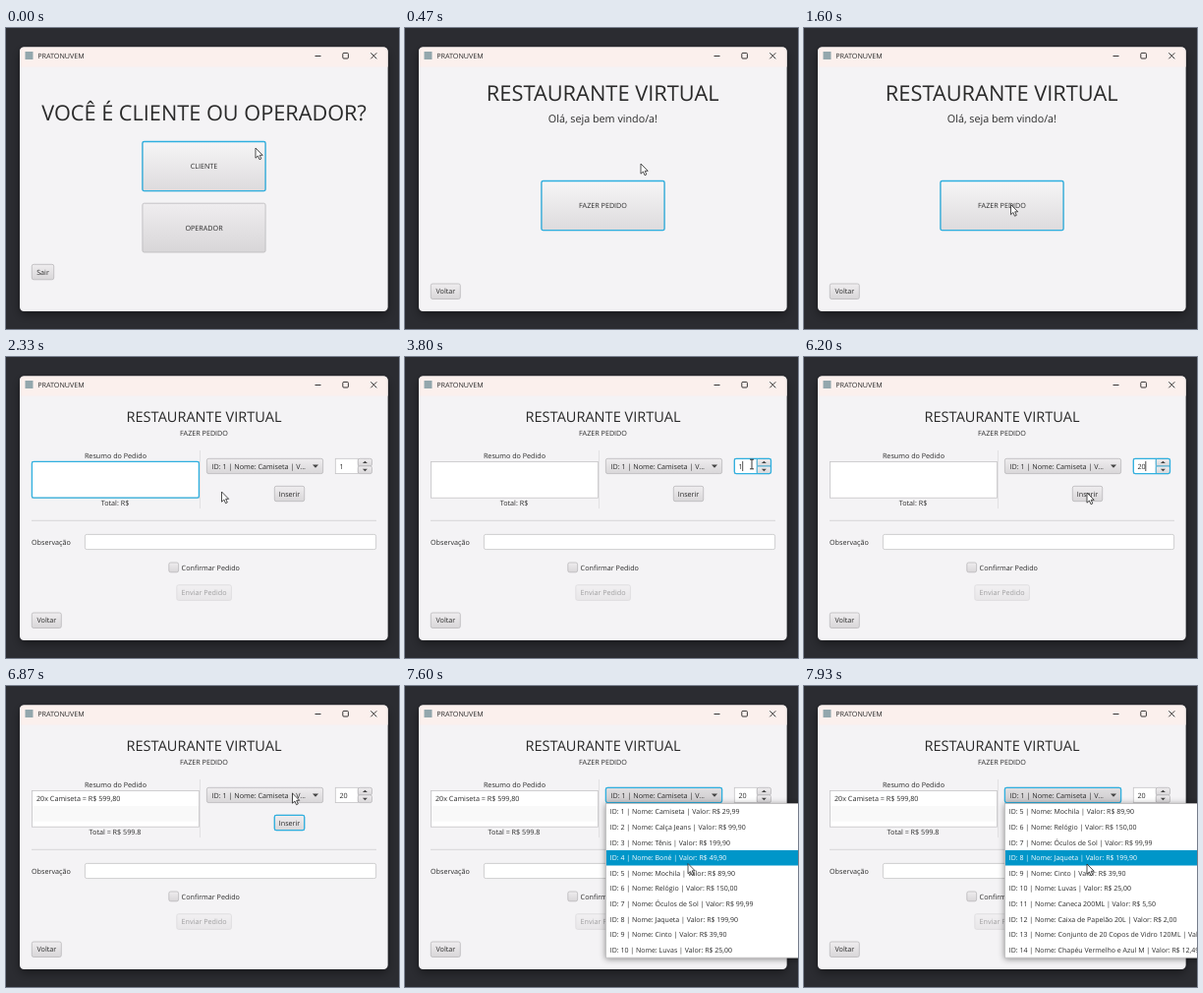
An HTML page for the animation above (8000 ms loop, 400 by 306 pixels).

```html
<!DOCTYPE html>
<html lang="pt">
<head>
<meta charset="utf-8">
<title>Restaurante virtual</title>
<style>
  html, body { margin: 0; width: 100%; height: 100%; overflow: hidden; background: #2b2c31; }
  svg { display: block; width: 100%; height: 100%; }
  text {
    font-family: "Open Sans", "Noto Sans", sans-serif; font-size: 7.2px; fill: #2a2a2a;
    white-space: pre; text-rendering: geometricPrecision;
  }
  .item { font-size: 7px; }
  .ring { fill: none; stroke: #2fb0e0; stroke-width: 1.3; }
  .field { fill: #fff; stroke: #c5c4c6; stroke-width: .8; }
  .line { stroke: #cfced0; stroke-width: .8; }
  .glyph { fill: none; stroke: #222; stroke-width: .9; }
</style>
</head>
<body>
<svg id="stage" viewBox="0 0 400 306"></svg>
<script>
const LOOP = 8000;
const ROW = 15.6, POPUP_TOP = 120.1, MAX_SCROLL = 4 * ROW;
const AT = {
  client: 470, order: 1670, spinner: 3420, two: 4700, twenty: 4950,
  insert: 6330, popup: 7130
};
const NOTCHES = [7740, 7870, 7930];

// Pointer path: time, x, y
const PATH = [
  [0, 254, 122], [350, 240, 138], [500, 240, 138], [1250, 210.5, 179.5], [1690, 210.5, 179.5],
  [2250, 219.5, 137], [2500, 219.5, 137], [3250, 353, 109], [3900, 353, 109], [4450, 338, 110],
  [5350, 338, 110], [6080, 288, 138], [6400, 288, 138], [6800, 291.5, 109], [7200, 291.5, 109],
  [7620, 288, 181], [8000, 288, 181]
];

const ITEMS = [
  ["Camiseta", "29,99"], ["Calça Jeans", "99,90"], ["Tênis", "199,90"], ["Boné", "49,90"],
  ["Mochila", "89,90"], ["Relógio", "150,00"], ["Óculos de Sol", "99,99"], ["Jaqueta", "199,90"],
  ["Cinto", "39,90"], ["Luvas", "25,00"], ["Caneca 200ML", "5,50"], ["Caixa de Papelão 20L", "2,00"],
  ["Conjunto de 20 Copos de Vidro 120ML", "45,00"], ["Chapéu Vermelho e Azul M", "12,49"]
];

const text = (x, y, str, attrs = "") => `<text x="${x}" y="${y}" ${attrs}>${str}</text>`;
const centered = (x, y, str, attrs = "") => text(x, y, str, `text-anchor="middle" ${attrs}`);
const sized = (x, y, str, size) => centered(x, y, str, `style="font-size:${size}px"`);
const rect = (x, y, w, h, attrs) => `<rect x="${x}" y="${y}" width="${w}" height="${h}" ${attrs}/>`;
const ring = (x, y, w, h, id = "") => rect(x, y, w, h, `rx="1.8" class="ring" id="${id}"`);
const face = (x, y, w, h, fill = "face") =>
  rect(x, y, w, h, `rx="1.8" fill="url(#${fill})" stroke="#b9b8ba" stroke-width=".8"`);
const button = (x, y, w, h, label, attrs = "", fill) =>
  `<g ${attrs}>${face(x, y, w, h, fill)}${centered(x + w / 2, y + h / 2 + 2.5, label)}</g>`;
const hotButton = (x, y, w, h, label) => button(x, y, w, h, label, "", "hotFace") + ring(x, y, w, h);
const path = (d, attrs) => `<path d="${d}" ${attrs}/>`;

const chrome = `
  ${rect(0, 0, 400, 306, 'fill="#2b2c31"')}
  ${rect(14, 19.5, 374.6, 268.5, 'rx="4.5" fill="#f4f3f5" filter="url(#windowShadow)"')}
  ${path("M14 39.5V24Q14 19.5 18.5 19.5H384.1Q388.6 19.5 388.6 24V39.5Z", 'fill="#fbf0ed"')}
  ${rect(19.5, 24, 8, 8, 'fill="#93a7ad"')}
  ${text(32.2, 30.9, "PRATONUVEM")}
  ${path("M314.5 28.5H320.5M371.3 25.3L377.3 31.3M377.3 25.3L371.3 31.3", 'class="glyph"')}
  ${rect(342.8, 25.4, 5.6, 5.6, 'rx="1" class="glyph"')}`;

const roleScene = `
  ${sized(201.5, 93.8, "VOCÊ É CLIENTE OU OPERADOR?", 21.7)}
  ${hotButton(138.9, 115.5, 125.2, 50.2, "CLIENTE")}
  ${button(138.9, 178.2, 125.2, 49.8, "OPERADOR")}
  ${button(26.3, 240.3, 22.4, 15.5, "Sair")}`;

const back = button(26.3, 260, 30, 15.5, "Voltar");

const welcomeScene = `
  ${sized(201.2, 74.3, "RESTAURANTE VIRTUAL", 21.8)}
  ${sized(201.4, 96.1, "Olá, seja bem vindo/a!", 10.75)}
  ${hotButton(138.9, 155.5, 125.2, 50.2, "FAZER PEDIDO")}
  ${back}`;

const orderScene = `
  ${sized(201.5, 66.3, "RESTAURANTE VIRTUAL", 14.55)}
  ${centered(201.5, 80.2, "FAZER PEDIDO")}
  ${centered(111.5, 103.4, "Resumo do Pedido")}
  ${rect(26.4, 106.4, 170, 36.8, 'class="field"')}
  <g id="inserted">
    ${rect(27, 122, 169, 15.6, 'fill="#f9f9f9"')}
    ${text(31, 116.9, "20x Camiseta = R$ 599,80")}
  </g>
  ${ring(26.4, 106.4, 170, 36.8, "listFocus")}
  ${centered(111, 151, "Total: R$", 'id="total"')}
  ${path("M197.5 95V154", 'class="line" opacity=".6"')}
  ${face(204.4, 103.3, 118.2, 15.3)}
  <g id="comboFocus">
    ${rect(204.4, 103.3, 118.2, 15.3, 'rx="1.8" fill="#000" opacity=".06"')}
    ${ring(204.4, 103.3, 118.2, 15.3)}
  </g>
  ${text(209.5, 113.6, "ID: 1 | Nome: Camiseta | V...")}
  ${path("M312 109.6H318L315 112.8Z", 'fill="#444"')}
  ${rect(335.3, 103.3, 23, 15.3, 'class="field"')}
  ${face(358.3, 103.3, 14.2, 7.6)}${face(358.3, 110.9, 14.2, 7.7)}
  ${path("M362.9 108.1L365.4 105.7L367.9 108.1ZM362.9 113.8L365.4 116.2L367.9 113.8Z", 'fill="#444"')}
  <g id="spinnerFocus">
    ${ring(335.3, 103.3, 37.2, 15.3)}
    ${path("M358.3 103.5V118.5M358.3 110.9H372.5", 'class="ring" opacity=".7"')}
  </g>
  ${text(339.4, 113.6, "1", 'id="amount"')}
  ${path("M0 106V116", 'id="caret" stroke="#222" stroke-width=".8"')}
  ${button(273.3, 131.3, 30.4, 15.4, "Inserir")}${ring(273.3, 131.3, 30.4, 15.4, "insertFocus")}
  ${path("M26 166.3H377", 'class="line"')}
  ${text(26, 190.9, "Observação")}
  ${rect(80.4, 180.4, 296.2, 15.2, 'rx="1.8" class="field"')}
  ${face(165.8, 209, 9.8, 9.8)}
  ${text(178.6, 216.7, "Confirmar Pedido")}
  ${button(173.8, 231.8, 55.6, 15.6, "Enviar Pedido", 'opacity=".42"')}
  ${back}`;

const popup = `
  ${rect(204.4, 119.6, 220, 156.6, 'fill="#fff" stroke="#b9b8ba" stroke-width=".8" filter="url(#popupShadow)"')}
  <g clip-path="url(#popupClip)"><g id="rows">
    ${rect(204.8, 0, 220, ROW, 'id="hover" fill="#0096c9"')}
    ${ITEMS.map(([name, price], i) =>
      text(208.7, POPUP_TOP + i * ROW + 10.3, `ID: ${i + 1} | Nome: ${name} | Valor: R$ ${price}`, 'class="item"')).join("")}
  </g></g>`;

const gradient = (id, top, bottom) => `<linearGradient id="${id}" x2="0" y2="1">
  <stop stop-color="${top}"/><stop offset="1" stop-color="${bottom}"/></linearGradient>`;
const shadow = (id, dy, blur, opacity) => `<filter id="${id}">
  <feDropShadow dx="0" dy="${dy}" stdDeviation="${blur}" flood-opacity="${opacity}"/></filter>`;

const stage = document.getElementById("stage");
stage.innerHTML = `
  <defs>
    ${gradient("face", "#efedef", "#d8d6d8")}
    ${gradient("hotFace", "#f6f5f6", "#dddbdd")}
    ${shadow("windowShadow", 4, 5, .4)}
    ${shadow("popupShadow", 1, 3, .45)}
    <clipPath id="popupClip">${rect(204.8, 119.9, 196, ROW * 10, "")}</clipPath>
  </defs>
  ${chrome}
  <g id="role">${roleScene}</g>
  <g id="welcome">${welcomeScene}</g>
  <g id="order">${orderScene}</g>
  <g id="popup">${popup}</g>
  <g id="pointer">
    ${path("M0 0V10.2L2.4 8L4 11.7L5.8 10.9L4.2 7.3H7.2Z",
      'id="arrow" fill="#fff" stroke="#222" stroke-width=".8" stroke-linejoin="round"')}
    ${path("M-2 -4.8H2M0 -4.8V4.8M-2 4.8H2", 'id="beam" class="glyph"')}
  </g>`;

const el = Object.fromEntries([...stage.querySelectorAll("[id]")].map(e => [e.id, e]));
const items = [...stage.querySelectorAll(".item")];
const show = (id, on) => { el[id].style.display = on ? "" : "none"; };
const write = (id, str) => { if (el[id].textContent !== str) el[id].textContent = str; };

function pointerAt(t) {
  const i = PATH.findIndex(p => p[0] > t);
  const [t0, x0, y0] = PATH[i - 1], [t1, x1, y1] = PATH[i];
  const u = (t - t0) / (t1 - t0), k = u * u * (3 - 2 * u);
  return [x0 + (x1 - x0) * k, y0 + (y1 - y0) * k];
}

function render(t) {
  const editing = t >= AT.spinner && t < AT.insert;
  const open = t >= AT.popup;
  show("role", t < AT.client);
  show("welcome", t >= AT.client && t < AT.order);
  show("order", t >= AT.order);
  show("popup", open);

  show("listFocus", t < AT.spinner);
  show("spinnerFocus", editing);
  show("insertFocus", t >= AT.insert && !open);
  show("comboFocus", open);
  show("inserted", t >= AT.insert);
  write("total", t < AT.insert ? "Total: R$" : "Total = R$ 599.8");

  const amount = t < AT.two ? "1" : t < AT.twenty ? "2" : "20";
  const lastEdit = Math.max(...[AT.spinner, AT.two, AT.twenty].filter(e => e <= t), 0);
  write("amount", amount);
  show("caret", editing && (t - lastEdit) % 1000 < 500);
  el.caret.setAttribute("transform", `translate(${339.6 + amount.length * 4.1} 0)`);

  const [x, y] = pointerAt(t);
  const beam = t >= AT.order && x > 335 && x < 358 && y > 103 && y < 119;
  show("beam", beam);
  show("arrow", !beam);
  el.pointer.setAttribute("transform", `translate(${x} ${y})`);

  if (open) {
    const scroll = Math.min(MAX_SCROLL, NOTCHES.filter(n => n <= t).length * 26.7);
    const active = Math.max(0, Math.floor((y - POPUP_TOP + scroll) / ROW));
    el.rows.setAttribute("transform", `translate(0 ${-scroll})`);
    el.hover.setAttribute("y", POPUP_TOP + active * ROW);
    items.forEach((item, i) => { item.style.fill = i === active ? "#fff" : ""; });
  }
}

const start = performance.now();
function tick() {
  render((performance.now() - start) % LOOP);
  requestAnimationFrame(tick);
}
tick();
</script>
</body>
</html>
```
